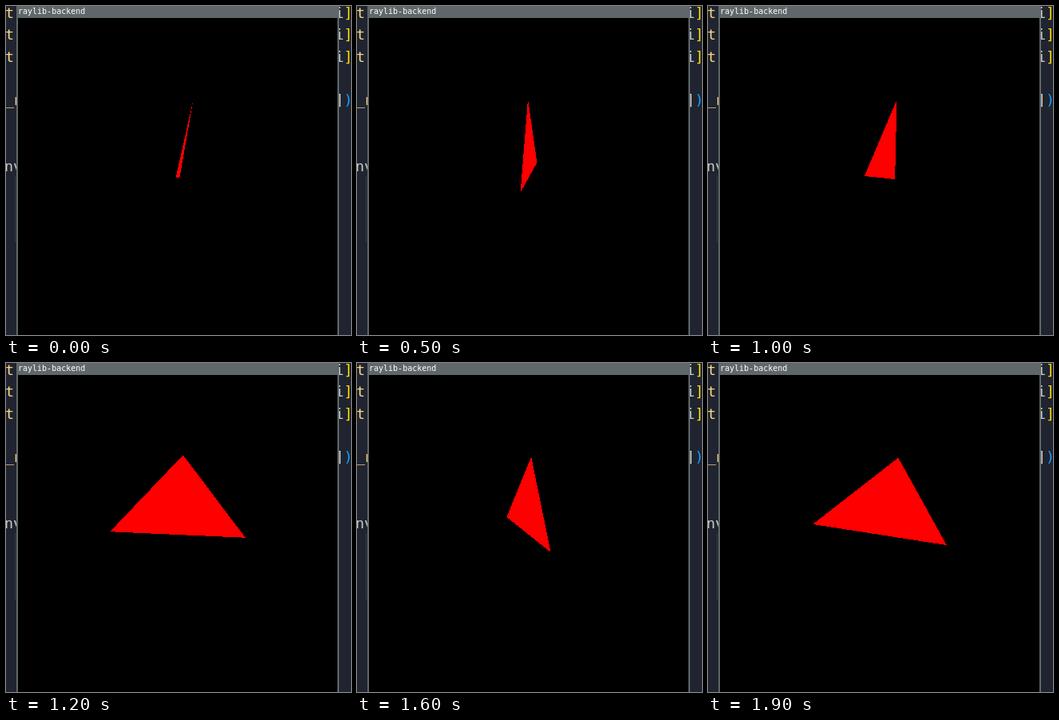
An HTML page for the animation above (2000 ms loop, 432 by 412 pixels).

```html
<!DOCTYPE html>
<html lang="en">
<head>
<meta charset="utf-8">
<title>raylib-backend</title>
<style>
  html, body { margin: 0; width: 100%; height: 100%; overflow: hidden; background: #1f2430; }
  svg { display: block; width: 432px; height: 412px; }
  .code { font: 18.4px "DejaVu Sans Mono", monospace; fill: #cccac2; white-space: pre; }
  .code .call { fill: #ffd580; }
  .code .gold { fill: #ffd700; }
  .code .blue { fill: #179fff; }
  .title { font: 10px "DejaVu Sans Mono", monospace; fill: #fff; }
</style>
</head>
<body>
<svg viewBox="0 0 432 412">
  <rect width="432" height="412" fill="#1f2430"/>
  <g class="code">
    <g class="call">
      <text x="-1" y="15">t</text>
      <text x="-1" y="42">t</text>
      <text x="-1" y="70">t</text>
      <text x="-1" y="124">_n</text>
    </g>
    <text x="-2" y="207">nv</text>
    <text x="412" y="15">i<tspan class="gold">]</tspan></text>
    <text x="412" y="42">i<tspan class="gold">]</tspan></text>
    <text x="412" y="70">i<tspan class="gold">]</tspan></text>
    <text x="412" y="124">]<tspan class="blue">)</tspan></text>
  </g>
  <rect x="11" y="213" width="1" height="83" fill="#363b47"/>

  <rect x="13" width="404" height="412" fill="#5f676a"/>
  <rect x="15" y="15" width="400" height="397" fill="#000"/>
  <text class="title" x="15" y="10">raylib-backend</text>
  <polygon id="triangle" fill="#f00" shape-rendering="crispEdges"/>
</svg>
<script>
  const triangle = document.getElementById('triangle');
  const CENTER = 215, SCALE = 100;
  const LOOP = 2000, STEP = 100;
  const START_ANGLE = 89.2, STEP_ANGLE = -34.75;

  const VERTICES = [[0, -1, 0], [-1, 0, 0], [1, 0, 0]];
  const AXIS = normalize([0.1, -1, 0.1]);

  function normalize(v) {
    const length = Math.hypot(...v);
    return v.map(n => n / length);
  }

  // Rodrigues rotation around AXIS, projected straight onto the screen.
  function project([x, y, z], angle) {
    const [kx, ky, kz] = AXIS;
    const cos = Math.cos(angle), sin = Math.sin(angle);
    const along = (kx * x + ky * y + kz * z) * (1 - cos);
    const px = x * cos + (ky * z - kz * y) * sin + kx * along;
    const py = y * cos + (kz * x - kx * z) * sin + ky * along;
    return [CENTER + SCALE * px, CENTER + SCALE * py];
  }

  function draw(now) {
    const step = Math.floor((now % LOOP) / STEP);
    const angle = (START_ANGLE + STEP_ANGLE * step) * Math.PI / 180;
    triangle.setAttribute('points', VERTICES.map(v => project(v, angle)).join(' '));
  }

  let start;
  function tick(now) {
    start ??= now;
    draw(Math.max(0, now - start));
    requestAnimationFrame(tick);
  }
  draw(0);
  requestAnimationFrame(tick);
</script>
</body>
</html>
```
